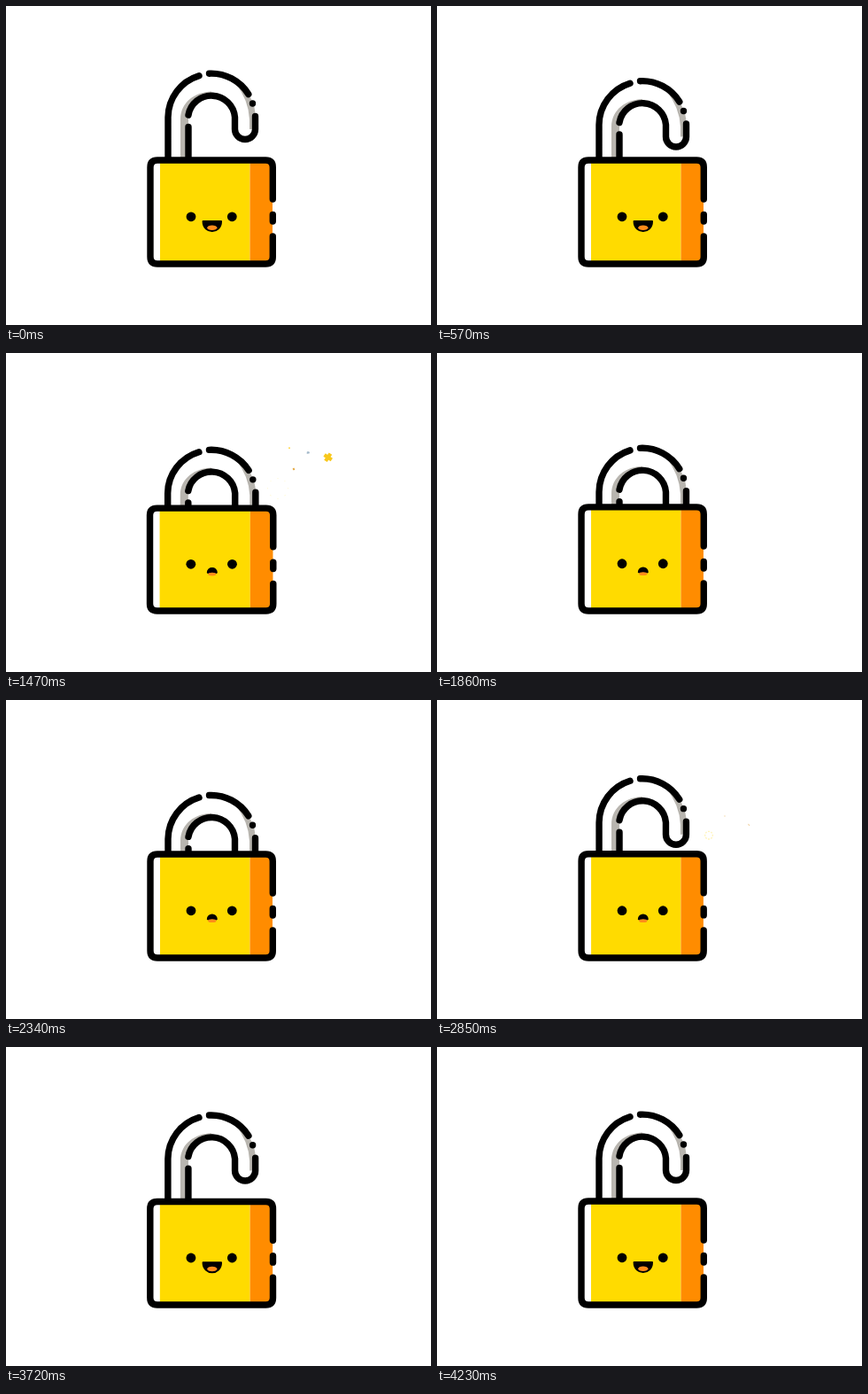
Recreate the animation shown at these times as an HTML page. Size 480x360 px, loop 4.26 s.

```html
<!DOCTYPE html>
<html>
<head>
<meta charset="utf-8">
<title>Padlock</title>
<style>
  html, body { margin: 0; width: 100%; height: 100%; overflow: hidden; background: #fff; }
  svg { display: block; width: 480px; height: 360px; }
  .line { fill: none; stroke: #000; stroke-width: 7.4; stroke-linecap: round; stroke-linejoin: round; }
  .shade { fill: #b8b5af; }
</style>
</head>
<body>
<svg viewBox="0 0 480 360">
  <g id="lock">
    <g id="shackle">
      <path class="shade" d="M197 176V128C197 108 214 97 232 96.500V99A26.500 26.500 0 0 0 206 125.500V176Z"/>
      <path class="shade" d="M259 87Q282 101 281.500 125V139H275V128Q274 106 259 87Z"/>
      <path class="line" d="M183 176V125.500A49.500 49.500 0 0 1 218 78.700M229.500 76.200A49.500 49.500 0 0 1 273.800 99.500M278.500 110h.01
        M281.500 124.500V139A11.500 11.500 0 0 1 258.500 139V125.500A26.500 26.500 0 0 0 206 123M206 136.500V176"/>
    </g>
    <rect x="163" y="174" width="138" height="117" rx="7" fill="#fff"/>
    <path fill="#ffdb00" d="M174 174H275.500V291H174Z"/>
    <path fill="#ff8c00" d="M275.500 174H294Q301 174 301 181V284Q301 291 294 291H275.500Z"/>
    <path class="line" d="M301.300 218V182Q301.300 174 293.300 174H171Q163 174 163 182V283Q163 291 171 291H293.300Q301.300 291 301.300 283V260M301.300 235.500V243"/>
    <circle cx="209" cy="237.800" r="5.400"/>
    <circle cx="255.300" cy="237.800" r="5.400"/>
    <path id="mouth" stroke="#000" stroke-width="2" stroke-linejoin="round"/>
    <ellipse id="tongue" cx="232.800" fill="#ff8c1a"/>
  </g>
  <g id="sparks" fill="none" stroke-linecap="round"></g>
</svg>
<script>
const LOOP = 4260;
const CLOSE = { move: 430, hit: 828, sparks: 780, amp: -0.077 };
const OPEN = { move: 2590, hit: 2850, sparks: 2800, amp: 0.09 };
const $ = id => document.getElementById(id);
const ramp = (t, a, b) => Math.min(1, Math.max(0, (t - a) / (b - a)));
const ease = u => u * u * (3 - 2 * u);
const mix = (a, b, u) => a + (b - a) * u;

// Damped stretch of the whole lock after the shackle stops
function bounce(t, { hit, amp }) {
  const age = t - hit;
  if (age < 0 || age > 1100) return 0;
  return amp * Math.sin(age * 2 * Math.PI / 530) * Math.exp(-0.00395 * (age - 132));
}

function path(d, color, width, extra = '') {
  return `<path d="${d}" stroke="${color}" stroke-width="${width}" ${extra}/>`;
}

function burst(a) {
  const outer = mix(5, 11.5, ease(ramp(a, 40, 520)));
  const inner = mix(3.6, 5.2, ramp(a, 40, 500)) + 7 * ramp(a, 570, 710);
  if (a < 20 || inner >= outer) return '';
  let d = '';
  for (let i = 0; i < 8; i++) {
    const c = Math.cos(i * Math.PI / 4), s = Math.sin(i * Math.PI / 4);
    d += `M${307 + inner * c} ${152.7 + inner * s}L${307 + outer * c} ${152.7 + outer * s}`;
  }
  const width = mix(2, 2.6, ramp(a, 50, 400)) * (1 - 0.7 * ramp(a, 580, 710));
  return path(d, '#ffdf45', width, `stroke-linecap="butt" opacity="${mix(0.3, 1, ramp(a, 40, 180))}"`);
}

// Arc that draws itself counter-clockwise, then is wiped from its start
function crescent(x, y, r, from, color, head, tail) {
  if (head <= tail) return '';
  const at = u => {
    const k = (from - 245 * u) * Math.PI / 180;
    return `${x + r * Math.cos(k)} ${y + r * Math.sin(k)}`;
  };
  const large = (head - tail) * 245 > 180 ? 1 : 0;
  return path(`M${at(tail)}A${r} ${r} 0 ${large} 0 ${at(head)}`, color, 2.3, 'stroke-linecap="butt"');
}

function cross(x, y, r, turn, color) {
  if (r <= 0) return '';
  return path(`M${-r} 0H${r}M0 ${-r}V${r}`, color, r * 0.85,
    `stroke-linecap="butt" transform="translate(${x} ${y}) rotate(${turn})"`);
}

function dot(x, y, r, color) {
  return r > 0 ? `<circle cx="${x}" cy="${y}" r="${r}" fill="${color}"/>` : '';
}

function sparks(a) {
  if (a < 0 || a > 840) return '';
  const life = (a0, a1, b0, b1) => ramp(a, a0, a1) * (1 - ramp(a, b0, b1));
  return burst(a)
    + crescent(340.5, 107.5, 5, -50, '#a5bacb', ramp(a, 80, 480), ramp(a, 540, 715))
    + crescent(349.5, 138, 3.9, 50, '#dc901c', ramp(a, 40, 420), ramp(a, 490, 690))
    + cross(363.700, 117.8, 5 * life(130, 420, 690, 830), 20 + a * 0.02, '#f8c81c')
    + cross(325, 131, 4 * life(20, 280, 580, 740), 45 - a * 0.055, '#e09a22')
    + dot(320, 107.3, 1.8 * life(190, 400, 590, 800), '#ffd43b')
    + dot(323.300, 165.800, 1.5 * life(60, 200, 540, 680), '#dc901c');
}

function mouth(sad) {
  const half = mix(10.2, 5, sad), y = mix(243, 247.5, sad);
  const top = mix(243, 240.8, sad), low = mix(257.8, 248, sad);
  const l = 232.8 - half, r = 232.8 + half;
  $('mouth').setAttribute('d', `M${l} ${y}C${l} ${top} ${r} ${top} ${r} ${y}C${r} ${low} ${l} ${low} ${l} ${y}Z`);
  const tongue = { cy: mix(250.3, 249.2, sad), rx: mix(5.6, 4.6, sad), ry: mix(2.8, 1.9, sad) };
  for (const k in tongue) $('tongue').setAttribute(k, tongue[k]);
}

function draw() {
  const t = performance.now() % LOOP;
  const slide = p => Math.pow(ramp(t, p.move, p.move + 400), 1.25);
  const stretch = bounce(t, CLOSE) + bounce(t, OPEN);
  $('shackle').setAttribute('transform', `translate(0 ${31.3 * (slide(CLOSE) - slide(OPEN))})`);
  $('lock').setAttribute('transform',
    `translate(232 291) scale(${1 - 0.7 * stretch} ${1 + stretch}) translate(-232 -291)`);
  mouth(ease(ramp(t, 830, 1050)) - ease(ramp(t, 2850, 3070)));
  $('sparks').innerHTML = sparks(t - CLOSE.sparks) + sparks(t - OPEN.sparks);
  requestAnimationFrame(draw);
}
draw();
</script>
</body>
</html>
```
